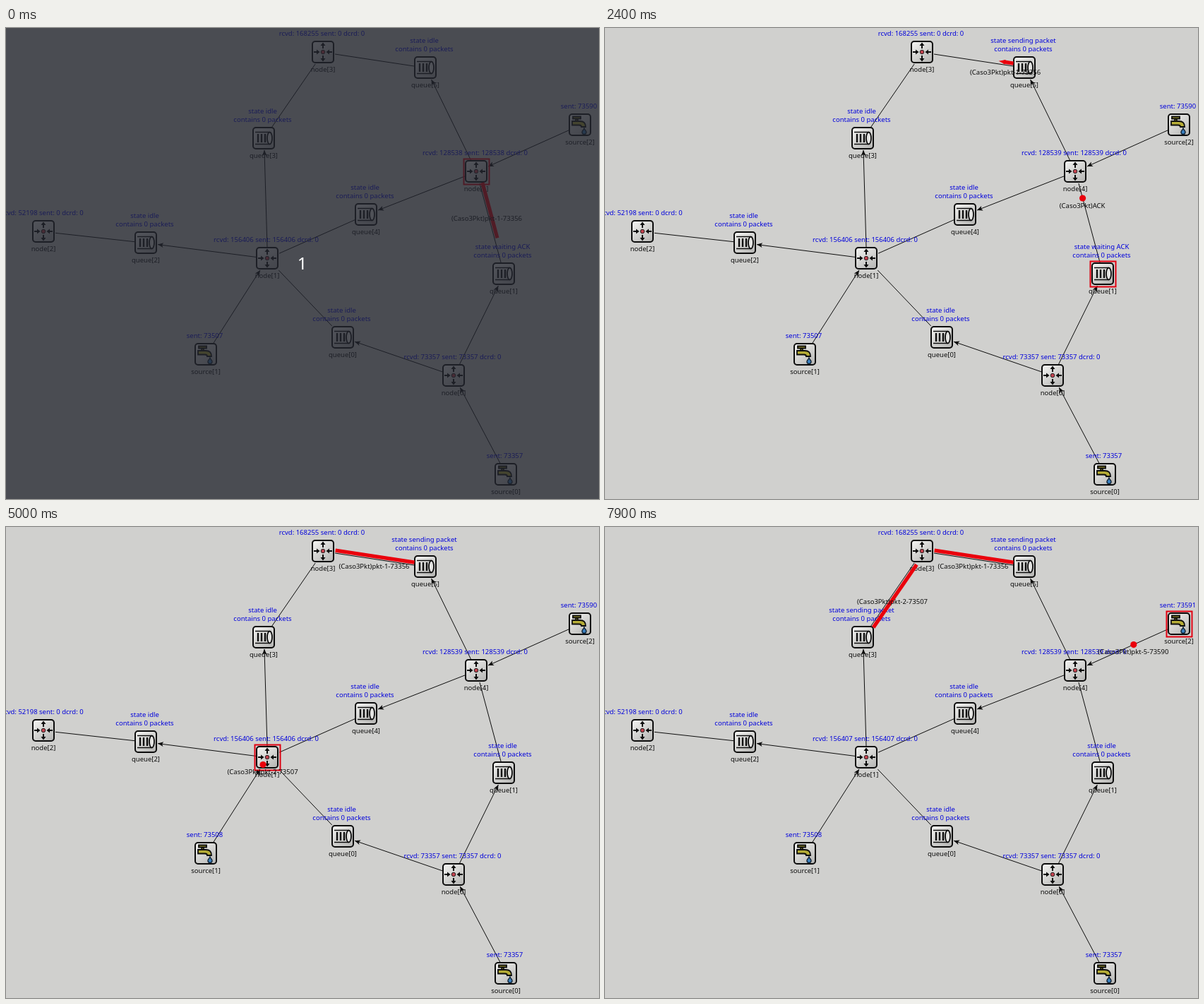
Write an HTML page with a canvas that moves like this. It is 840 px wide and 667 px high and loops after 8000 ms.

```html
<!DOCTYPE html>
<html lang="en">
<head>
<meta charset="utf-8">
<title>Packet network simulation</title>
<style>
  html, body { margin: 0; overflow: hidden; background: #d0d0ce; }
  canvas { display: block; }
</style>
</head>
<body>
<canvas id="stage" width="840" height="667"></canvas>
<script>
const ctx = document.getElementById('stage').getContext('2d');
const RED = '#ea000c', BLUE = '#0000dc', INK = '#0c0c0c', LOOP = 8000, HALF = 16.5;
const FONT = '500 9.5px "Noto Sans", "Open Sans", sans-serif';

const places = {
  'node[0]': [634, 492], 'node[1]': [370, 326], 'node[2]': [53, 288],
  'node[3]': [449, 34], 'node[4]': [666, 203],
  'queue[0]': [477, 438], 'queue[1]': [705, 348], 'queue[2]': [198, 304],
  'queue[3]': [365, 156], 'queue[4]': [510, 264], 'queue[5]': [594, 56],
  'source[0]': [708, 632], 'source[1]': [283, 462], 'source[2]': [813, 137]
};
const node = i => places[`node[${i}]`];
const queue = i => places[`queue[${i}]`];
const source = i => places[`source[${i}]`];

// [from, to, has arrowhead]
const links = [
  [source(0), node(0), 1], [source(1), node(1), 1], [source(2), node(4), 1],
  [node(0), queue(0), 1], [node(0), queue(1), 1], [node(1), queue(2), 1],
  [node(1), queue(3), 1], [node(4), queue(4), 1], [node(4), queue(5), 1],
  [queue(0), node(1)], [queue(1), node(4)], [queue(2), node(2)],
  [queue(3), node(3)], [queue(4), node(1)], [queue(5), node(3)]
];

const mix = (a, b, u) => [a[0] + (b[0] - a[0]) * u, a[1] + (b[1] - a[1]) * u];

// Part of the line a-b that lies outside both icons
function clip(a, b) {
  const u = HALF / Math.max(Math.abs(b[0] - a[0]), Math.abs(b[1] - a[1]));
  return [mix(a, b, u), mix(a, b, 1 - u)];
}

// Piecewise linear value through [time, value] pairs
function track(t, keys) {
  if (t <= keys[0][0]) return keys[0][1];
  for (let i = 1; i < keys.length; i++) {
    const [t0, v0] = keys[i - 1], [t1, v1] = keys[i];
    if (t <= t1) return v0 + (v1 - v0) * (t - t0) / (t1 - t0);
  }
  return keys[keys.length - 1][1];
}

// Text keeps its baseline on whole pixels
function text(str, x, y, color) {
  ctx.save();
  ctx.resetTransform();
  ctx.font = FONT;
  ctx.textAlign = 'center';
  ctx.fillStyle = color;
  ctx.fillText(str, x, Math.round(y + 3.5));
  ctx.restore();
}

function shape(d, fill, stroke, width = 1) {
  const path = new Path2D(d);
  if (fill) { ctx.fillStyle = fill; ctx.fill(path); }
  if (stroke) { ctx.strokeStyle = stroke; ctx.lineWidth = width; ctx.stroke(path); }
}

function circle(x, y, r, fill, stroke) {
  ctx.beginPath();
  ctx.arc(x, y, r, 0, 7);
  ctx.fillStyle = fill;
  ctx.fill();
  if (stroke) { ctx.strokeStyle = stroke; ctx.lineWidth = 1; ctx.stroke(); }
}

// Filled head with its tip at p, pointing along angle
function head(p, angle, length, half, color) {
  ctx.save();
  ctx.translate(...p);
  ctx.rotate(angle);
  shape(`M0 0L${-length} ${-half}L${-length * .75} 0L${-length} ${half}z`, color);
  ctx.restore();
}

function link([a, b, arrow]) {
  const [p, q] = clip(a, b);
  ctx.strokeStyle = INK;
  ctx.lineWidth = 1;
  ctx.beginPath();
  ctx.moveTo(...p);
  ctx.lineTo(...q);
  ctx.stroke();
  if (arrow) head(q, Math.atan2(b[1] - a[1], b[0] - a[0]), 8, 3.5, INK);
}

const glyphs = {
  // vertical arrows point outwards, horizontal ones inwards
  node() {
    for (const turn of [0, Math.PI]) {
      ctx.save();
      ctx.rotate(turn);
      shape('M0-5V-10M-13 0H-8', null, INK, 2);
      shape('M-3.5-9L0-13.500L3.500-9zM-9-3.500L-4.500 0L-9 3.500z', INK);
      ctx.restore();
    }
    circle(0, 0, 2.8, '#c4424e', '#222');
  },
  queue() {
    shape('M-12-8.500H8M-12 8.500H8', null, INK, 1.5);
    shape('M-8-6V6M-3-6V6M2-6V6', null, INK, 2.4);
    ctx.beginPath();
    ctx.ellipse(8.5, 0, 3.5, 8.5, 0, 0, 7);
    ctx.fillStyle = '#e4e4e2';
    ctx.fill();
    ctx.lineWidth = 1.8;
    ctx.stroke();
  },
  source() {
    shape('M-6-8h3v4h-3z', '#8b8528', INK, 1.6);
    shape('M-10-11.500H1V-8.500H-10z', '#a8a02c', INK, 1.8);
    shape('M-11-5H0C6-5 8-2 8 3H2C2 1 1 .5-1 .5H-11z', '#b5ac36', INK, 1.8);
    shape('M6 5C7 8 9 8.500 9 10.500A3 3 0 0 1 3 10.500C3 8.500 5 8 6 5z', '#3a80c0', '#123', 1.4);
  }
};

function icon(name, [x, y]) {
  ctx.save();
  ctx.translate(x, y);
  const shade = ctx.createLinearGradient(-12, -16, 12, 16);
  shade.addColorStop(0, '#f4f4f2');
  shade.addColorStop(1, '#b4b4b2');
  ctx.beginPath();
  ctx.roundRect(-15, -15, 30, 30, 4);
  ctx.fillStyle = shade;
  ctx.fill();
  ctx.strokeStyle = INK;
  ctx.lineWidth = 2;
  ctx.stroke();
  glyphs[name.split('[')[0]]();
  ctx.restore();
  text(name, x, y + 24, INK);
}

function caption(lines, [x, y]) {
  lines.forEach((line, i) =>
    text(line, x - 1.5, y - 27 - 12 * (lines.length - 1 - i), BLUE));
}

function captions(t) {
  const passed = t < 1000 ? 128538 : 128539, routed = t < 5200 ? 156406 : 156407;
  const counts = [[73357, 73357], [routed, routed], [52198, 0], [168255, 0], [passed, passed]];
  counts.forEach(([r, s], i) => caption([`rcvd: ${r} sent: ${s} dcrd: 0`], node(i)));
  [73357, t < 3800 ? 73507 : 73508, t < 7600 ? 73590 : 73591]
    .forEach((n, i) => caption([`sent: ${n}`], source(i)));
  const states = Array(6).fill('idle');
  if (t < 3400) states[1] = 'waiting ACK';
  if (t >= 6100) states[3] = 'sending packet';
  if (t >= 2000) states[5] = 'sending packet';
  states.forEach((s, i) => caption([`state ${s}`, 'contains 0 packets'], queue(i)));
}

function dot(a, b, u, label) {
  const [x, y] = mix(a, b, u);
  circle(x, y, 4.6, RED);
  text(`(Caso3Pkt)${label}`, x, y + 10.5, INK);
}

// Transmission bar beside the link, covering the share u0..u1
function beam(a, b, u0, u1, label) {
  const [p, q] = clip(a, b);
  const angle = Math.atan2(q[1] - p[1], q[0] - p[0]);
  const shift = ([x, y]) => [x - Math.sin(angle) * 4, y + Math.cos(angle) * 4];
  const from = shift(mix(p, q, u0)), to = shift(mix(p, q, u1));
  const length = Math.hypot(to[0] - from[0], to[1] - from[1]);
  ctx.strokeStyle = RED;
  ctx.lineWidth = 5.3;
  ctx.beginPath();
  ctx.moveTo(...from);
  ctx.lineTo(...(u1 < 1 ? mix(from, to, Math.max(0, 1 - 7 / length)) : to));
  ctx.stroke();
  if (u1 < 1) head(to, angle, Math.min(10, length), 3.5, RED);
  const [x, y] = mix(p, q, (u0 + u1) / 2);
  text(`(Caso3Pkt)${label}`, x, y + 10.5, INK);
}

function highlight(t) {
  const turns = [[0, node(4)], [1900, queue(5)], [2100, queue(1)], [3500, source(1)],
    [5000, node(1)], [6100, queue(3)], [6200, source(2)]];
  const [x, y] = turns.filter(turn => turn[0] <= t).pop()[1];
  ctx.strokeStyle = '#e00010';
  ctx.lineWidth = 2;
  ctx.strokeRect(x - 18, y - 18, 36, 36);
}

function bubble([x, y], str, width) {
  const l = x - width / 2, r = x + width / 2, top = y - 27, low = y - 10;
  shape(`M${l + 3} ${top}H${r - 3}q3 0 3 3V${low - 3}q0 3-3 3H${x + 8}L${x} ${y}L${x + 2} ${low}` +
    `H${l + 3}q-3 0-3-3V${top + 3}q0-3 3-3z`, '#ffffd8', INK);
  text(str, x, y - 18.5, INK);
}

function packets(t) {
  const first = 'pkt-1-73356', second = 'pkt-2-73507';
  if (t < 800) beam(queue(1), node(4), t < 500 ? .3 : t < 700 ? .81 : .91, 1, first);
  else if (t < 1000) dot(queue(1), node(4), .89, first);
  else if (t < 2000)
    dot(node(4), queue(5), track(t, [[1000, .11], [1700, .646], [1800, .78], [1900, .86]]), first);
  if (t >= 1000 && t < 3400)
    dot(node(4), queue(1), track(t, [[2200, .11], [3100, .779], [3240, .883]]), 'ACK');
  if (t > 2200)
    beam(queue(5), node(3), 0, track(t, [[2200, 0], [3100, .84], [3270, 1]]), first);

  if (t >= 3800 && t < 5200)
    dot(source(1), node(1), track(t, [[3800, .169], [4600, .743], [4860, .926]]), second);
  else if (t >= 5200 && t < 6100)
    dot(node(1), queue(3), track(t, [[5200, .1], [5900, .8], [6000, .87]]), second);
  if (t > 6200)
    beam(queue(3), node(3), 0, track(t, [[6200, 0], [6900, .57], [7400, 1]]), second);

  if (t >= 7600)
    dot(source(2), node(4), track(t, [[7600, .177], [7900, .44]]), 'pkt-5-73590');
}

function draw(t) {
  ctx.fillStyle = '#d0d0ce';
  ctx.fillRect(0, 0, 840, 667);
  ctx.setTransform(1, 0, 0, 1, .5, .5);  // lines run through pixel centres
  links.forEach(link);
  ctx.resetTransform();
  for (const name in places) icon(name, places[name]);
  captions(t);
  ctx.setTransform(1, 0, 0, 1, .5, .5);
  highlight(t);
  packets(t);
  if (t >= 1000 && t < 2100) bubble(node(4), 'ARRIVED. ACK SENT. FORWARDING!', 164);
  if (t >= 5200 && t < 6300) bubble(node(1), 'ARRIVED FROM SOURCE. FORWARDING!', 186);
  ctx.resetTransform();
  if (t < 500) {
    ctx.fillStyle = 'rgba(34, 37, 46, .77)';
    ctx.fillRect(0, 0, 840, 667);
    ctx.font = '24px "Noto Sans", sans-serif';
    ctx.textAlign = 'center';
    ctx.fillStyle = '#fff';
    ctx.fillText('1', 419.5, 342);
  }
}

const start = performance.now();
function frame() {
  const t = (performance.now() - start) % LOOP;
  draw(Math.floor(t / 100) * 100);
  requestAnimationFrame(frame);
}
frame();
</script>
</body>
</html>
```
